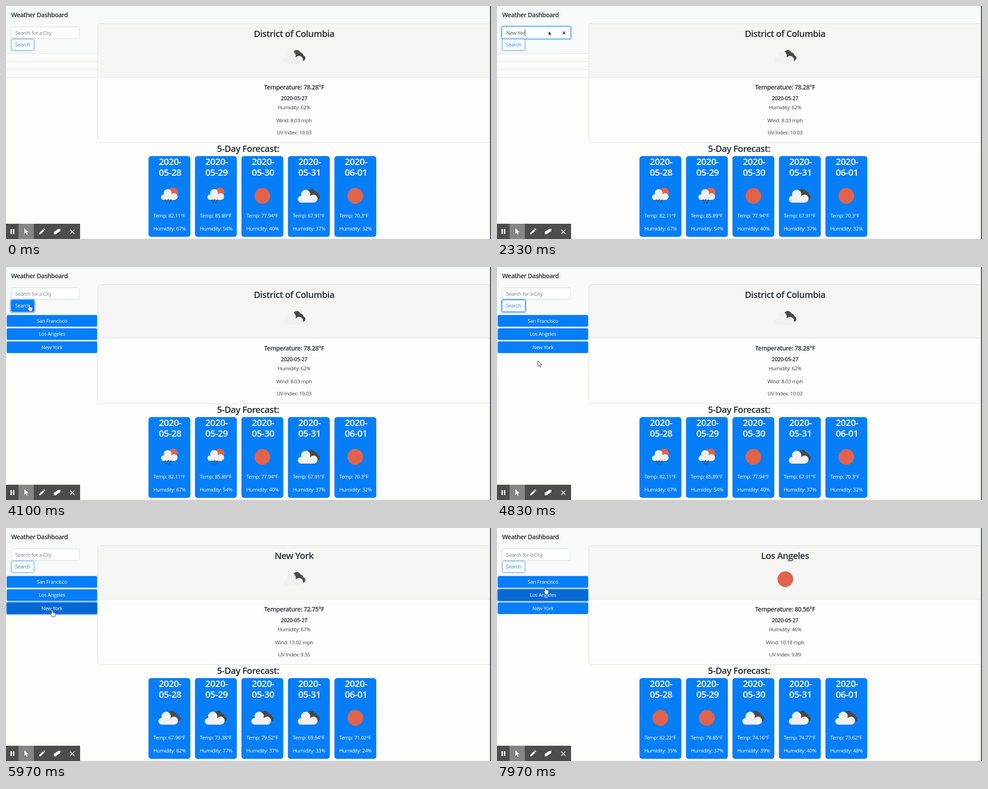
Animation of 1080 by 519 pixels, one loop 8000 ms. Source, as an HTML page:

```html
<!DOCTYPE html>
<html lang="en">
<head>
<meta charset="utf-8">
<title>Weather Dashboard</title>
<style>
  html, body { margin: 0; width: 100%; height: 100%; overflow: hidden; background: #fdfdfc; }
  svg { display: block; width: 100%; height: 100%; }
  text { font: 11.4px "Open Sans", "Noto Sans", sans-serif; letter-spacing: -.03em; fill: #3a3d40; white-space: pre; }
  .mid { text-anchor: middle; }
  .bold { font-weight: 600; fill: #25292d; }
  .h1 { font-size: 20px; }
  .h2 { font-size: 13.8px; }
  .date { font-size: 12px; }
  .day { font-size: 20.5px; }
  .white { fill: #fff; }
  .line { fill: none; stroke: #dcdde3; }
  .ring { fill: none; stroke: #007bff; stroke-opacity: .42; stroke-width: 2.6; }
</style>
</head>
<body>
<svg id="stage" viewBox="0 0 1080 519">
  <defs>
    <g id="cloud">
      <circle cx="-17" cy="7.5" r="7.5"/><circle cx="-7" cy="-3.5" r="10.3"/>
      <circle cx="10.5" cy="6" r="9"/><path d="M-17 0H10V15H-17Z"/>
    </g>
    <g id="clouds">
      <g fill="#484a49"><circle cx="5.5" cy="-7.5" r="8.5"/><circle cx="13" cy="-3" r="7.5"/><circle cx="18.5" cy="2" r="6.2"/></g>
      <use href="#cloud" fill="#f1f1f1"/>
    </g>
    <circle id="sun" r="17.5" fill="#e1634b"/>
    <g id="rain">
      <circle cx="8.5" cy="-8" r="10.5" fill="#e1634b"/>
      <use href="#cloud" fill="#f1f1f1" transform="translate(2 -3.6) scale(.84)"/>
      <path d="M-8 8l-2 3M-2 7l-2 4M4 8l-2 3M-5 13l-2 3M1 13l-1 4" stroke="#3e454d" stroke-width="2"/>
    </g>
    <path id="arrow" d="M0 0V12.5L3 9.8L5 14.3L7 13.5L5 9H9Z"/>
    <path id="hand" d="M-1.5 1Q0 -1 1.3 1V6L6 7Q7.5 7.5 7.3 9L6.3 13V16H-.8V14L-4 9.5Q-4.5 7.5-3 8L-1.5 9.5Z"/>
  </defs>

  <path d="M0 0H1078V40H204V105H0Z" fill="#f8f9f9"/>
  <text class="bold h2" x="11.5" y="25">Weather Dashboard</text>

  <rect id="inputRing" class="ring" x="9.7" y="44.7" width="155.6" height="29.6" rx="4"/>
  <rect id="input" x="11.5" y="46.5" width="152" height="26" rx="3" fill="#fff" stroke="#d3d7db"/>
  <text id="typed" x="20.5" y="64"></text>
  <path id="caret" d="M.5 52V67.5" stroke="#222"/>
  <path id="clear" d="M146.3 57.3l5.6 5.6m0-5.6l-5.6 5.6" stroke="#274b7c" stroke-width="2"/>

  <rect id="searchRing" class="ring" x="9.7" y="71.7" width="54.6" height="29.6" rx="4"/>
  <rect id="search" x="11.5" y="73.5" width="51" height="26" rx="3" stroke="#2a8df5"/>
  <text id="searchText" class="mid" x="37" y="90">Search</text>

  <path id="emptyRows" class="line" d="M0 105.5H204M0 123.5H204M0 141.5H204M0 159.5H204"/>
  <g id="list"></g>

  <rect class="line" x="204.5" y="39.5" width="874" height="265" rx="4" style="fill:#fdfdfd"/>
  <path d="M205 40H1078V158H205Z" fill="#f5f6f4"/>
  <path class="line" d="M205 158.5H1078"/>
  <text class="bold h1 mid" x="539" y="324.5">5-Day Forecast:</text>
  <g id="reports"></g>

  <path d="M165 518.5H1078" stroke="#e6e7e7"/>
  <path d="M1078.7 0V519" stroke="#15181a" stroke-width="1.6"/>
  <g id="toolbar">
    <path d="M0 485H165V519H0Z" fill="#4d4d4d"/>
    <path d="M28 485H62V519H28Z" fill="#858585"/>
    <g fill="#fff">
      <path d="M10 497h3v11h-3zM15.500 497h3v11h-3z"/>
      <use href="#arrow" x="41" y="495"/>
      <path d="M73.500 509l1-4 7.500-7.500 3 3-7.500 7.500zM83 496.500l1.500-1.500 3 3-1.500 1.500z"/>
      <path d="M106.500 503l10-6.500h5l-1 5-10 7h-4z"/>
      <path d="M143 498l9.500 9.500m0-9.500l-9.500 9.500" stroke="#fff" stroke-width="1.6"/>
    </g>
  </g>
  <use id="cursor" stroke-width=".9" stroke-linejoin="round"/>
</svg>

<script>
const LOOP = 8000;
const $ = id => document.getElementById(id);
const label = (cls, x, y, s) => `<text class="${cls}" x="${x}" y="${y}">${s}</text>`;
const icon = (name, x, y) => `<use href="#${name}" x="${x}" y="${y}"/>`;

const days = ["05-28", "05-29", "05-30", "05-31", "06-01"];
const cities = [
  { name: "District of Columbia", icon: "clouds", temp: "78.28", hum: 62, wind: "8.03", uv: "10.03",
    icons: ["rain", "rain", "sun", "clouds", "sun"],
    temps: ["82.11", "85.89", "77.94", "67.91", "70.3"], hums: [67, 54, 40, 37, 32] },
  { name: "New York", icon: "clouds", temp: "72.75", hum: 67, wind: "13.02", uv: "9.35",
    icons: ["clouds", "clouds", "clouds", "clouds", "sun"],
    temps: ["67.96", "73.38", "79.52", "69.64", "71.02"], hums: [82, 77, 37, 33, 24] },
  { name: "Los Angeles", icon: "sun", temp: "80.56", hum: 46, wind: "10.18", uv: "9.89",
    icons: ["sun", "sun", "clouds", "clouds", "clouds"],
    temps: ["82.22", "78.85", "74.16", "74.77", "73.62"], hums: [35, 37, 39, 40, 48] },
];

function dayCard(city, i) {
  const x = 317.3 + 103.5 * i, mid = x + 48;
  return `<rect x="${x}" y="334.3" width="93.200" height="180" rx="6" fill="#067ef7"/>` +
    label("bold day white mid", mid, 354, "2020-") + label("bold day white mid", mid, 377.5, days[i]) +
    icon(city.icons[i], x + 46.5, 423) +
    label("white", x + 10.7, 471, `Temp: ${city.temps[i]}°F`) +
    label("white", x + 10.7, 499.5, `Humidity: ${city.hums[i]}%`);
}

$("reports").innerHTML = cities.map(c => "<g>" +
  label("bold h1 mid", 641.5, 68.5, c.name) + icon(c.icon, 642, 114) +
  label("bold h2 mid", 641.5, 186, `Temperature: ${c.temp}°F`) +
  label("bold date mid", 641.5, 209.5, "2020-05-27") +
  label("mid", 641.5, 230, `Humidity: ${c.hum}%`) +
  label("mid", 641.5, 258.5, `Wind: ${c.wind} mph`) +
  label("mid", 641.5, 286, `UV Index: ${c.uv}`) +
  days.map((_, i) => dayCard(c, i)).join("") + "</g>").join("");

$("list").innerHTML = ["San Francisco", "Los Angeles", "New York"].map((name, i) => {
  const y = 107 + 29.4 * i;
  return `<path class="line" d="M0 ${y - 1.5}H204"/>
    <rect class="ring" x=".7" y="${y - 1}" width="203.600" height="28" rx="4"/>
    <rect class="fill" x="1.5" y="${y}" width="201.500" height="26" rx="3"/>` +
    label("white mid", 102.3, y + 17, name);
}).join("");
const rings = $("list").querySelectorAll(".ring");
const fills = $("list").querySelectorAll(".fill");

const FOCUS = 320, SUBMIT = 3830, LISTED = 3900;
const PICK_NY = 5650, SHOW_NY = 5870, PICK_LA = 7160, SHOW_LA = 7430;
const word = "New York";
const keyTimes = [1000, 1230, 1330, 1500, 1930, 2130, 2300, 2570];
const path = [
  [30, 230, 230], [400, 115, 56], [3350, 115, 56], [3370, 115, 60], [3590, 115, 60], [3720, 52, 83],
  [4530, 52, 83], [4830, 91, 209], [5000, 95, 212], [5360, 103, 182], [6300, 103, 182],
  [6930, 110, 160], [7100, 109, 158], [7720, 109, 158], [7970, 108, 132],
];

const clamp = v => Math.max(0, Math.min(1, v));
const ease = v => v * v * (3 - 2 * v);
// CSS-like 150 ms transition on at `from`, off at `to`
const fade = (t, from, to) => ease(clamp((t - from) / 150)) - ease(clamp((t - to) / 150));
const mix = (a, b, k) => `rgb(${a.map((v, i) => Math.round(v + (b[i] - v) * k))})`;
const show = (el, on) => el.style.display = on ? "" : "none";

const BLUE = [6, 126, 247], DARK = [6, 104, 212], LIGHT = [250, 252, 253], WHITE = [255, 255, 255];

function cursorAt(t) {
  const i = Math.max(1, path.findIndex(p => p[0] > t));
  if (t >= path[path.length - 1][0]) return path[path.length - 1].slice(1);
  const [a, b] = [path[i - 1], path[i]];
  const k = ease(clamp((t - a[0]) / (b[0] - a[0])));
  return [a[1] + (b[1] - a[1]) * k, a[2] + (b[2] - a[2]) * k];
}

function drawCursor(t) {
  const [x, y] = cursorAt(t);
  const within = (x0, y0, x1, y1) => x >= x0 && x <= x1 && y >= y0 && y <= y1;
  const listed = t >= LISTED;
  const hand = within(11, 73, 63, 100) ||
    listed && [107, 136.4, 165.8].some(top => within(2, top, 203, top + 26));
  const small = !hand && within(11, 46, 164, 73);
  const el = $("cursor");
  show(el, t >= 30);
  el.setAttribute("href", hand ? "#hand" : "#arrow");
  el.setAttribute("transform", `translate(${x} ${y}) scale(${small ? .75 : 1})`);
  el.setAttribute("fill", small ? "#111" : "#fff");
  el.setAttribute("stroke", small ? "#fff" : "#2b3440");
}

function drawInput(t) {
  const focused = t >= FOCUS && t < SUBMIT;
  const count = t < LISTED ? keyTimes.filter(k => k <= t).length : 0;
  const typed = $("typed"), value = word.slice(0, count);
  typed.textContent = value || "Search for a City";
  typed.style.fill = value ? "#495057" : "#777d83";
  const focus = fade(t, FOCUS, SUBMIT);
  $("inputRing").style.opacity = focus;
  $("input").setAttribute("stroke", mix([211, 215, 219], [128, 189, 255], focus));
  show($("clear"), count);
  const last = count ? keyTimes[count - 1] : FOCUS;
  show($("caret"), focused && Math.floor((t - last) / 530) % 2 === 0);
  const width = count ? typed.getComputedTextLength() : 0;
  $("caret").setAttribute("transform", `translate(${Math.round(20 + width)} 0)`);
}

function drawButtons(t) {
  const hover = fade(t, 3640, 4570);
  $("search").setAttribute("fill", mix(LIGHT, BLUE, hover));
  $("searchText").style.fill = mix([45, 138, 240], WHITE, hover);
  $("searchRing").style.opacity = fade(t, SUBMIT, PICK_NY);
  show($("emptyRows"), t < LISTED);
  show($("list"), t >= LISTED);
  const hovers = [0, fade(t, 6880, 7955), fade(t, 5340, 6800)];
  const focus = [0, fade(t, PICK_LA, LOOP), fade(t, PICK_NY, PICK_LA)];
  fills.forEach((el, i) => el.setAttribute("fill", mix(BLUE, DARK, hovers[i])));
  rings.forEach((el, i) => el.style.opacity = focus[i]);
}

function frame() {
  const t = performance.now() % LOOP;
  const city = t < SHOW_NY ? 0 : t < SHOW_LA ? 1 : 2;
  [...$("reports").children].forEach((g, i) => show(g, i === city));
  drawInput(t);
  drawButtons(t);
  drawCursor(t);
  requestAnimationFrame(frame);
}
frame();
</script>
</body>
</html>
```
